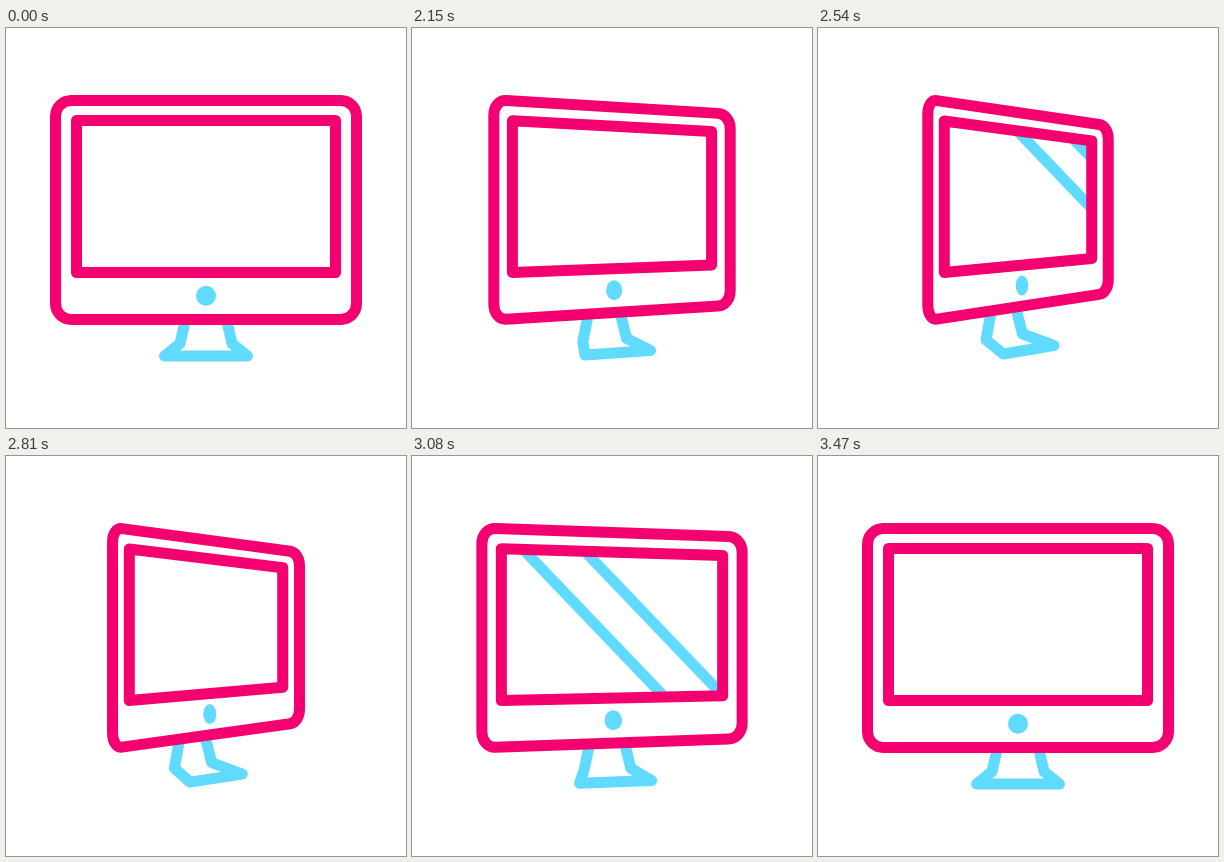
Animation of 400x400 px, one loop 3650 ms. Source, as an HTML page:

```html
<!DOCTYPE html>
<html lang="en">
<head>
<meta charset="utf-8">
<title>Turning monitor</title>
<style>
  html, body { margin: 0; width: 100%; height: 100%; overflow: hidden; background: #fff; }
  svg { display: block; width: 100%; height: 100%; }

  .line { fill: none; stroke-width: 11; stroke-linecap: round; stroke-linejoin: round; }
  .pink { stroke: #f50070; }
  .blue { stroke: #61daff; }
  .button { fill: #61daff; }

  /* Each part morphs between its front and its turned outline. */
  .part { d: var(--front); animation: turn 3650ms infinite; }

  .case {
    --front: path("M65.5 72.5 L334.5 72.5 C343.5 72.5 350.5 79.5 350.5 88.5 L350.5 275.5 C350.5 284.5 343.5 291.5 334.5 291.5 L65.5 291.5 C56.5 291.5 49.5 284.5 49.5 275.5 L49.5 88.5 C49.5 79.5 56.5 72.5 65.5 72.5 Z");
    --side: path("M119 72.6 L281 96.6 C286 97.4 290 103 290 111 L290 252 C290 259.5 286 265.6 281 266.3 L119 291.1 C114 291.9 110 286 110 277 L110 86 C110 77 114 71.9 119 72.6 Z");
  }
  .screen {
    --front: path("M70.5 92.5 L329.5 92.5 L329.5 244.5 L70.5 244.5 Z");
    --side: path("M126.5 93 L273.5 113 L273.5 230.5 L126.5 244.5 Z");
  }
  .stand {
    --front: path("M179 294 L174 315.5 L158.5 328 L241.5 328 L226 315.5 L221 294");
    --side: path("M173 284 L168 312 L185.5 326 L236 317.5 L204.5 306 L198 281");
  }
  .button {
    --front: path("M190 267.7 a10 10 0 1 1 20 0 a10 10 0 1 1 -20 0 Z");
    --side: path("M197.7 257.5 a6.3 10 0 1 1 12.6 0 a6.3 10 0 1 1 -12.6 0 Z");
  }

  @keyframes turn {
    0% { d: var(--front); }
    54.795% { d: var(--front); animation-timing-function: cubic-bezier(.25, 0, .05, 1); }
    71.233% { d: var(--side); animation-timing-function: cubic-bezier(.7, 0, .3, 1); }
    95.068%, 100% { d: var(--front); }
  }

  /* Two glints cross the screen, once on the way out and once on the way back. */
  .glint { animation: 3650ms linear infinite; }
  .lead { animation-name: lead; }
  .trail { animation-name: trail; }

  @keyframes lead {
    0%, 61.64% { transform: translateX(-300px); }
    61.644% { transform: translateX(-121px); }
    72.329% { transform: translateX(241px); }
    72.33% { transform: translateX(-300px); }
    76.712% { transform: translateX(-146px); }
    93.151%, 100% { transform: translateX(340px); }
  }
  @keyframes trail {
    0%, 61.64% { transform: translateX(-300px); }
    61.644% { transform: translateX(-190px); }
    72.329% { transform: translateX(200px); }
    72.33% { transform: translateX(-300px); }
    76.712% { transform: translateX(-196px); }
    93.151%, 100% { transform: translateX(269px); }
  }
</style>
</head>
<body>
<svg viewBox="0 0 400 400">
  <clipPath id="glass"><path class="part screen"/></clipPath>
  <path class="part stand line blue"/>
  <g clip-path="url(#glass)">
    <path class="glint lead line blue" d="M0 0 L382.8 400"/>
    <path class="glint trail line blue" d="M0 0 L382.8 400"/>
  </g>
  <path class="part screen line pink"/>
  <path class="part case line pink"/>
  <path class="part button"/>
</svg>
</body>
</html>
```
